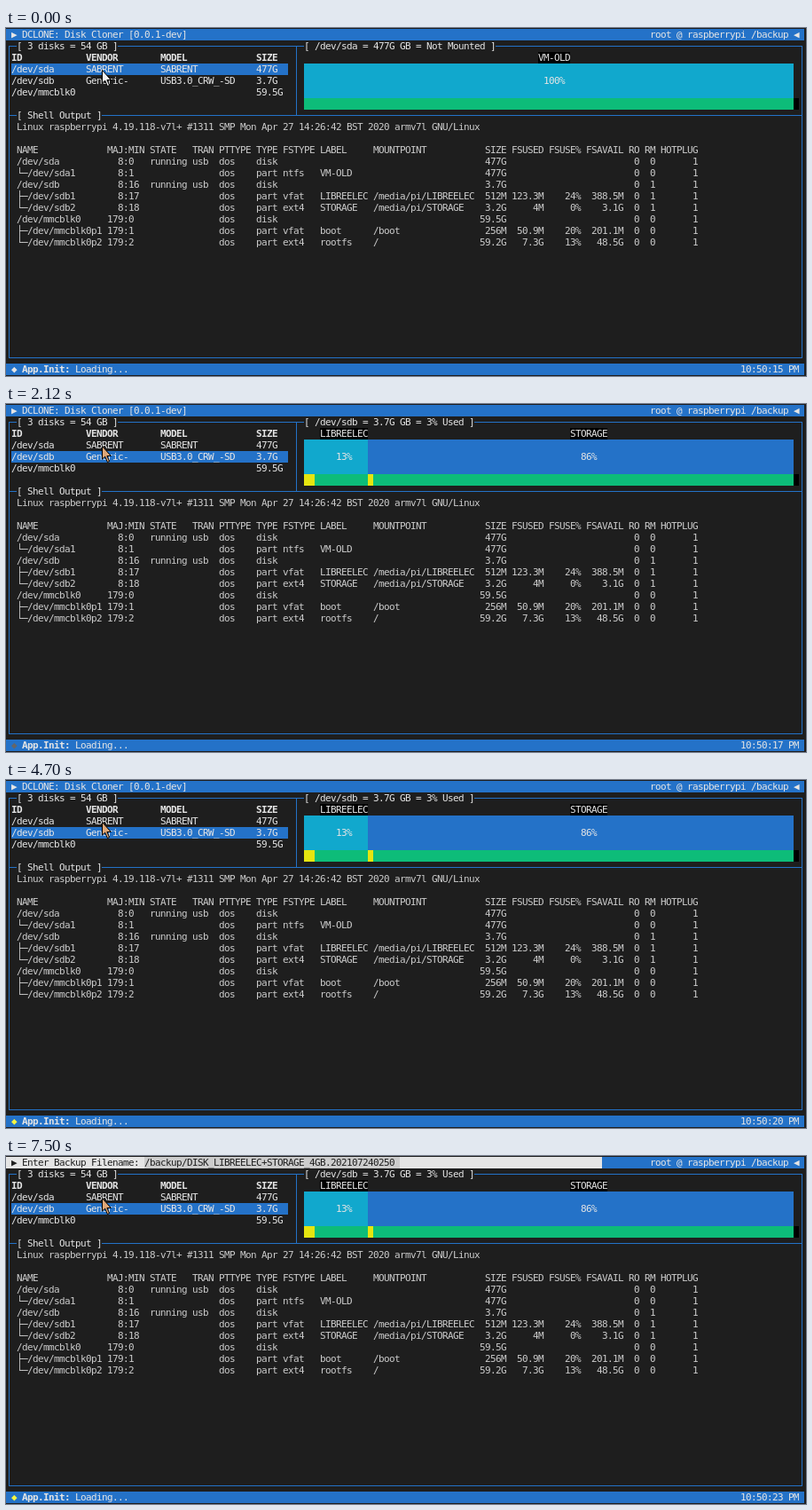
These frames come from a looping animation (902x392 px, 8000 ms). An HTML page:

```html
<!DOCTYPE html>
<html lang="en">
<head>
<meta charset="utf-8">
<title>Disk cloner terminal</title>
<style>
:root {
  --bg: #1e1e1e; --blue: #2472c8; --cyan: #11a8cd; --green: #0dbc79;
  --yellow: #e5e510; --white: #e5e5e5; --grey: #cccccc;
}
html, body { margin: 0; width: 100%; height: 100%; overflow: hidden; background: var(--bg); }
#term {
  position: relative; width: 902px; height: 392px; overflow: hidden; color: var(--white);
  font: 11px/13px "DejaVu Sans Mono", monospace; letter-spacing: calc(6px - 1ch);
  font-variant-ligatures: none;
}
/* Character grid: 6 x 13 cells, placed by column (--c), row (--r), width (--w), height (--h) */
.t, .b {
  position: absolute; white-space: pre;
  left: calc(var(--c) * 6px); top: calc(var(--r) * 13px + 1px);
}
.b { width: calc(var(--w) * 6px); height: calc(var(--h, 1) * 13px); background: var(--blue); }
.bold { font-weight: bold; }
.title { background: var(--bg); }
.label { background: #000; }
.shell { color: var(--grey); }
.line { position: absolute; background: var(--blue); }
.h { left: 3px; width: 895px; height: 1px; }
.v { top: 20px; width: 1px; height: 352px; }

.panel, #pick, #mark, #secs, #entry, #mouse { animation: 8s step-end infinite; }
.panel { visibility: hidden; }
#sda { animation-name: sda; }
#sdb { animation-name: sdb; }
#mmc { animation-name: mmc; }
@keyframes sda { 0% { visibility: visible } 13.25%, 100% { visibility: hidden } }
@keyframes sdb {
  0%, 34.75% { visibility: hidden } 13.25%, 58.75%, 100% { visibility: visible }
}
@keyframes mmc { 0%, 58.75%, 100% { visibility: hidden } 34.75% { visibility: visible } }

#pick { animation-name: pick; }
@keyframes pick {
  0% { transform: none }
  12.5%, 57.25%, 100% { transform: translateY(13px) }
  34% { transform: translateY(26px) }
}
#mouse { position: absolute; left: 0; top: 0; stroke: #000; animation-name: mouse; }
@keyframes mouse {
  0%, 34% { fill: #f2f2f2 }
  12.5%, 57.25%, 100% { fill: #dfa878 }
}
#mark { animation-name: mark; }
@keyframes mark {
  0% { color: #e5e5e5 }
  7.375%, 14%, 26.5%, 31.625%, 45.5%, 51.375%, 63.75%, 70.25%, 83.875%, 89% { color: #666666 }
  10.5%, 28.875%, 48.25%, 67.25%, 86.25% { color: #2472c8 }
  17.125%, 35.875%, 54.125%, 73%, 92.125%, 100% { color: #f5f543 }
}
#clock { height: 13px; overflow: hidden; }
#secs { animation-name: secs; }
@keyframes secs {
  0% { transform: none }
  6.625% { transform: translateY(-13px) }
  19.875% { transform: translateY(-26px) }
  31.625% { transform: translateY(-39px) }
  44% { transform: translateY(-52px) }
  56.5% { transform: translateY(-65px) }
  68.75% { transform: translateY(-78px) }
  81.125% { transform: translateY(-91px) }
  93.75%, 100% { transform: translateY(-104px) }
}
#entry { visibility: hidden; color: #1e1e1e; animation-name: entry; }
@keyframes entry { 0% { visibility: hidden } 81.875%, 100% { visibility: visible } }
</style>
</head>
<body>
<div id="term">
  <div class="line h" style="top:20px"></div>
  <div class="line h" style="top:98px"></div>
  <div class="line h" style="top:371px"></div>
  <div class="line v" style="left:3px"></div>
  <div class="line v" style="left:327px;height:78px"></div>
  <div class="line v" style="left:897px"></div>

  <div class="b" style="--c:0;--r:0;--w:150"></div>
  <div class="t" style="--c:1;--r:0">▶ DCLONE: Disk Cloner [0.0.1-dev]</div>
  <div class="t" style="--c:121;--r:0">root @ raspberrypi /backup ◀</div>
  <div id="entry">
    <div class="b" style="--c:0;--r:0;--w:112;background:var(--white)"></div>
    <div class="b" style="--c:26;--r:0;--w:48;background:var(--grey)"></div>
    <div class="t" style="--c:1;--r:0">▶ Enter Backup Filename: /backup/DISK_LIBREELEC+STORAGE_4GB.202107240250</div>
  </div>

  <div class="t title" style="--c:2;--r:1">[ 3 disks = 54 GB ]</div>
  <div id="pick" class="b" style="--c:1;--r:3;--w:52"></div>
  <div id="disks"></div>
  <svg id="mouse" width="130" height="70">
    <path d="M108.5 47.5V62l3.2-2.8 2.7 6.3 2.2-1-2.7-6h4.4z"/>
  </svg>

  <div id="panels"></div>

  <div class="t title" style="--c:2;--r:7">[ Shell Output ]</div>
  <div class="t shell" style="--c:2;--r:8">Linux raspberrypi 4.19.118-v7l+ #1311 SMP Mon Apr 27 14:26:42 BST 2020 armv7l GNU/Linux</div>
  <div id="blk"></div>

  <div class="b" style="--c:0;--r:29;--w:150"></div>
  <div id="mark" class="t" style="--c:1;--r:29">◆</div>
  <div class="t" style="--c:3;--r:29"><b>App.Init:</b> Loading...</div>
  <div id="clock" class="t" style="--c:138;--r:29"><div id="secs"></div></div>
</div>
<script>
const $ = id => document.getElementById(id);

function put(parent, cls, c, r, text, css = "") {
  const el = document.createElement("div");
  el.className = cls;
  el.style.cssText = `--c:${c};--r:${r};${css}`;
  el.textContent = text;
  parent.append(el);
}

// Lays "|"-separated cells out in columns; a negative column is a right edge.
function table(parent, cls, row, cols, lines) {
  lines.forEach((line, i) => line.split("|").forEach((text, k) => {
    const col = cols[k] < 0 ? -cols[k] - text.length : cols[k];
    if (text) put(parent, cls, col, row + i, text);
  }));
}

table($("disks"), "t bold", 2, [1, 15, 29, 47], ["ID|VENDOR|MODEL|SIZE"]);
table($("disks"), "t", 3, [1, 15, 29, 47], [
  "/dev/sda|SABRENT|SABRENT|477G",
  "/dev/sdb|Generic-|USB3.0_CRW_-SD|3.7G",
  "/dev/mmcblk0|||59.5G"
]);

table($("blk"), "t shell", 10,
  [2, -26, 27, 35, 40, 47, 52, 59, 69, -94, -101, -108, -116, -119, -122, -130], [
  "NAME|MAJ:MIN|STATE|TRAN|PTTYPE|TYPE|FSTYPE|LABEL|MOUNTPOINT|SIZE|FSUSED|FSUSE%|FSAVAIL|RO|RM|HOTPLUG",
  "/dev/sda|8:0  |running|usb|dos|disk||||477G||||0|0|1",
  "└─/dev/sda1|8:1  |||dos|part|ntfs|VM-OLD||477G||||0|0|1",
  "/dev/sdb|8:16 |running|usb|dos|disk||||3.7G||||0|1|1",
  "├─/dev/sdb1|8:17 |||dos|part|vfat|LIBREELEC|/media/pi/LIBREELEC|512M|123.3M|24%|388.5M|0|1|1",
  "└─/dev/sdb2|8:18 |||dos|part|ext4|STORAGE|/media/pi/STORAGE|3.2G|4M|0%|3.1G|0|1|1",
  "/dev/mmcblk0|179:0  |||dos|disk||||59.5G||||0|0|1",
  "├─/dev/mmcblk0p1|179:1  |||dos|part|vfat|boot|/boot|256M|50.9M|20%|201.1M|0|0|1",
  "└─/dev/mmcblk0p2|179:2  |||dos|part|ext4|rootfs|/|59.2G|7.3G|13%|48.5G|0|0|1"
]);

// Each part: label, label column, share, share column, first column, width, used width
const colors = ["cyan", "blue"];
function panel(id, title, parts) {
  const box = document.createElement("div");
  box.id = id;
  box.className = "panel";
  const bar = (c, r, w, h, color) =>
    put(box, "b", c, r, "", `--w:${w};--h:${h};background:${color}`);
  put(box, "t title", 56, 1, `[ ${title} ]`);
  bar(148, 6, 1, 1, "#000");
  parts.forEach(([label, labelCol, share, shareCol, c, w, used], i) => {
    bar(c, 3, w, 3, `var(--${colors[i]})`);
    bar(c, 6, w, 1, "var(--green)");
    bar(c, 6, used, 1, "var(--yellow)");
    put(box, "t label", labelCol, 2, label);
    put(box, "t", shareCol, 4, share);
  });
  $("panels").append(box);
}

panel("sda", "/dev/sda = 477G GB = Not Mounted", [
  ["VM-OLD", 100, "100%", 101, 56, 92, 0]
]);
panel("sdb", "/dev/sdb = 3.7G GB = 3% Used", [
  ["LIBREELEC", 59, "13%", 62, 56, 12, 2],
  ["STORAGE", 106, "86%", 108, 68, 80, 1]
]);
panel("mmc", "/dev/mmcblk0 = 59.5G GB = 12% Used", [
  ["boot", 60, "0%", 61, 56, 9, 1],
  ["rootfs", 105, "99%", 106, 65, 83, 10]
]);

$("secs").textContent = Array.from({ length: 9 }, (_, i) => `10:50:${15 + i} PM`).join("\n");
</script>
</body>
</html>
```
